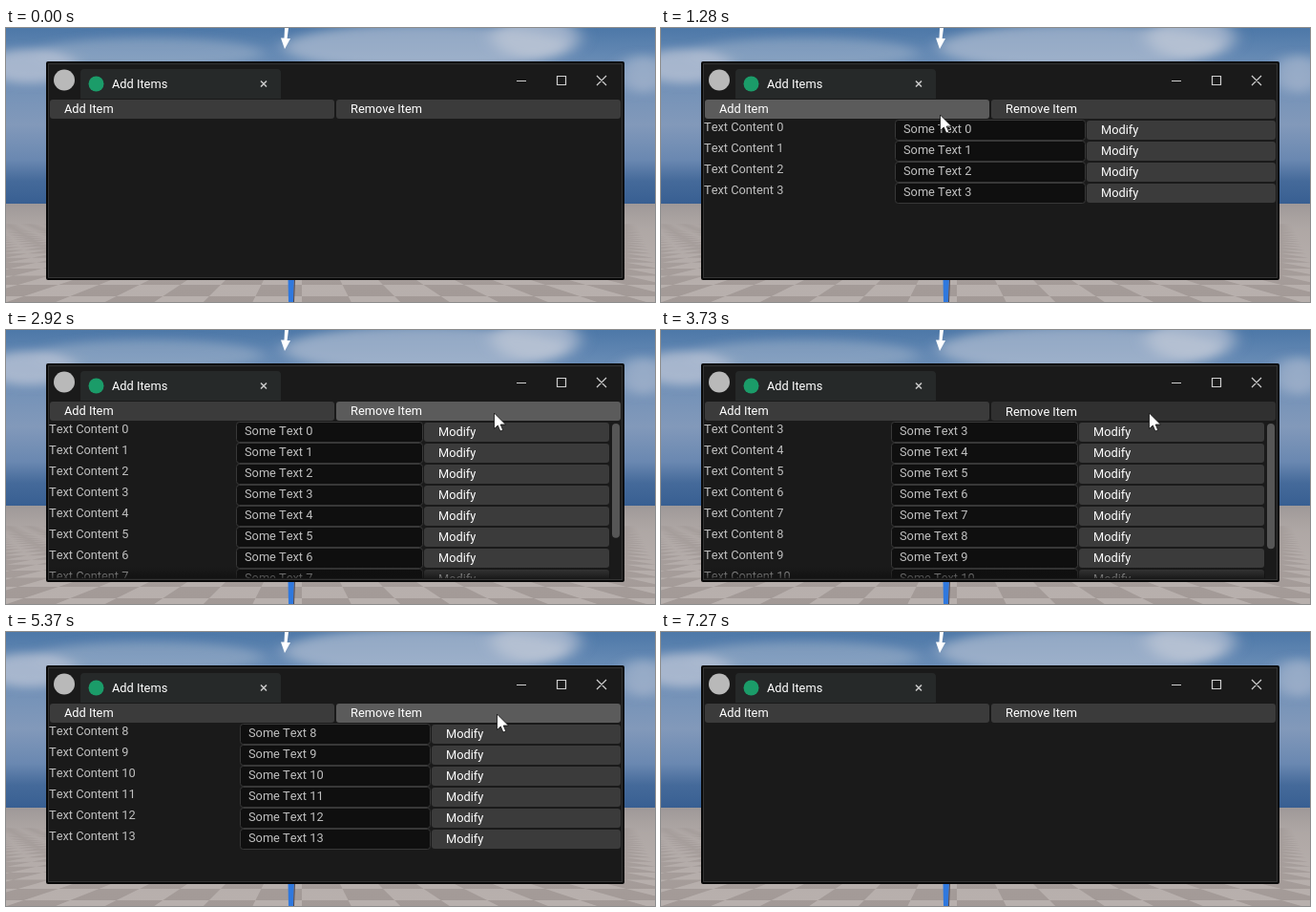
Write an HTML page that moves like this. It is 680 px wide and 287 px high and loops after 7470 ms.

```html
<!DOCTYPE html>
<html lang="en">
<head>
<meta charset="utf-8">
<title>Add Items</title>
<style>
html, body { margin: 0; width: 100%; height: 100%; overflow: hidden; background: #1a1a1a; }
svg { display: block; width: 680px; height: 287px; }
text { font: 12.8px Roboto, "Open Sans", sans-serif; font-kerning: none; fill: #c0c0c0; white-space: pre; }
.label { fill: #fff; }
.btn { fill: #3b3b3b; }
.btn.hover { fill: #5b5b5b; }
.btn.down { fill: #303030; }
.edit { fill: #0f0f0f; stroke: #383838; }
</style>
</head>
<body>
<svg viewBox="0 0 680 287">
  <defs>
    <linearGradient id="sky" x2="0" y2="1">
      <stop offset="0" stop-color="#4d78a8"/>
      <stop offset=".2" stop-color="#6a8db6"/>
      <stop offset=".55" stop-color="#8299ba"/>
      <stop offset=".75" stop-color="#6a88b1"/>
      <stop offset=".87" stop-color="#456a9a"/>
      <stop offset="1" stop-color="#385f92"/>
    </linearGradient>
    <linearGradient id="haze" x2="0" y2="1">
      <stop offset="0" stop-color="#9e9898"/>
      <stop offset=".25" stop-color="#a8a19f" stop-opacity=".6"/>
      <stop offset="1" stop-color="#b4acaa" stop-opacity="0"/>
    </linearGradient>
    <linearGradient id="shade" x2="0" y2="1">
      <stop offset="0" stop-color="#101010" stop-opacity="0"/>
      <stop offset="1" stop-color="#101010" stop-opacity=".75"/>
    </linearGradient>
    <filter id="soft" x="-50%" y="-100%" width="200%" height="300%"><feGaussianBlur stdDeviation="9 5"/></filter>
    <clipPath id="list"><rect x="44" y="96" width="602" height="164"/></clipPath>
  </defs>

  <rect width="680" height="184" fill="url(#sky)"/>
  <g filter="url(#soft)" fill="#c0c8d8">
    <ellipse cx="25" cy="40" rx="50" ry="18" opacity=".7"/>
    <ellipse cx="150" cy="26" rx="120" ry="16" opacity=".35"/>
    <ellipse cx="440" cy="20" rx="150" ry="24" opacity=".6"/>
    <ellipse cx="555" cy="10" rx="46" ry="22" opacity=".7"/>
    <ellipse cx="668" cy="48" rx="26" ry="20" opacity=".5"/>
  </g>
  <rect y="184" width="680" height="103" fill="#b8b0ad"/>
  <path id="floor" fill="#a29996"/>
  <rect y="184" width="680" height="103" fill="url(#haze)"/>

  <path d="M292 0H296L294.600 11H298L292 22 288 10.500H291.500Z" fill="#fff"/>
  <path d="M295.500 262H302L301 287H296Z" fill="#2f78de"/>
  <path d="M302.500 262 301.500 287" stroke="#4a4450"/>

  <rect x="42" y="35" width="606" height="229" rx="2" fill="#080808"/>
  <rect x="44" y="37" width="602" height="225" fill="#1a1a1a"/>
  <rect x="44.500" y="37.500" width="601" height="224" fill="none" stroke="#343434"/>
  <path d="M78 74V47Q78 43 82 43H284Q288 43 288 47V74Z" fill="#262929"/>
  <circle cx="61" cy="54.500" r="11" fill="#b9b9b9"/>
  <circle cx="94.500" cy="58.500" r="8" fill="#1b9c69"/>
  <text class="label" x="111" y="63">Add Items</text>
  <path d="M267 55.500 273 61.500M273 55.500 267 61.500" stroke="#c8c8c8" stroke-width="1.600"/>
  <path d="M535 55.500H545M577.500 50.500H586.500V59.500H577.500ZM619 50 629 60M629 50 619 60" fill="none" stroke="#cfcfcf" stroke-width="1.200"/>

  <g id="top"></g>
  <g clip-path="url(#list)">
    <g id="rows"></g>
    <rect id="fade" x="45" y="248" width="588" height="12" fill="url(#shade)"/>
  </g>
  <rect id="thumb" x="635" y="98" width="8" rx="4" fill="#565656"/>

  <circle id="ring" cx="514" cy="85" r="12" fill="#a39c14"/>
  <path id="cursor" d="M0 0V16.500L3.800 13 6.400 19 9.200 17.800 6.700 12H12Z" fill="#fff" stroke="#111" stroke-width=".8"/>
</svg>
<script>
const LOOP = 7470, VISIBLE = 8, PITCH = 22;
const ADD_HOLD = 75, REMOVE_HOLD = 140, HOVER_LAG = 70, RING_FROM = 4700;

// Click release times: adding speeds up, removing comes in two steady bursts
const series = (n, at) => Array.from({ length: n }, (_, i) => at(i));
const adds = series(14, i => 720 + 190 * i - 3 * i * i);
const removes = series(14, i => (i < 5 ? 3130 : 3935) + 205 * i);

// Pointer path: time, x, y
const path = [
  [70, 360, 264], [450, 292.5, 91], [2650, 292.5, 91], [2860, 511.5, 87], [4050, 511.5, 87],
  [4250, 520, 200], [4430, 519, 200], [4520, 517.5, 159.5], [4650, 514.5, 86],
  [6660, 514.5, 86], [7270, 530, 287]
];

const $ = id => document.getElementById(id);
function set(node, attrs) {
  for (const key in attrs) node.setAttribute(key, attrs[key]);
}
function el(parent, name, attrs, text = "") {
  const node = document.createElementNS("http://www.w3.org/2000/svg", name);
  set(node, attrs);
  node.textContent = text;
  return parent.appendChild(node);
}
const show = (node, on) => set(node, { visibility: on ? "visible" : "hidden" });

function button(parent, x, y, width, label) {
  return {
    y,
    box: el(parent, "rect", { x, y, width, height: 20, rx: 3, class: "btn" }),
    label: el(parent, "text", { x: x + 15, y: y + 14, class: "label" }, label)
  };
}
function paint(b, hover, down) {
  set(b.box, { class: "btn" + (down ? " down" : hover ? " hover" : "") });
  set(b.label, { y: b.y + (down ? 15 : 14) });
}

// Checkered floor in perspective: depth is the distance below the horizon
function drawFloor() {
  const point = (col, depth) => `${(310 + col * depth / 2).toFixed(1)} ${(184 + depth).toFixed(1)}`;
  let d = "";
  for (let k = 6; k < 32; k++) {
    const near = 680 / k, far = 680 / (k + 1), cols = Math.ceil(700 / far);
    for (let j = -cols; j < cols; j++) {
      if ((j + k) % 2) continue;
      d += `M${point(j, near)}L${point(j + 1, near)} ${point(j + 1, far)} ${point(j, far)}Z`;
    }
  }
  set($("floor"), { d });
}

drawFloor();
const addBtn = button($("top"), 46, 75, 298, "Add Item");
const removeBtn = button($("top"), 346, 75, 298, "Remove Item");
const rows = series(VISIBLE, i => {
  const g = el($("rows"), "g", {}), y = 97 + i * PITCH;
  return {
    g,
    name: el(g, "text", { x: 45, y: y + 11 }),
    edit: el(g, "rect", { y: y - .5, height: 21, rx: 3, class: "edit" }),
    value: el(g, "text", { y: y + 13 }),
    modify: button(g, 446, y, 198, "Modify")
  };
});

function pointer(t) {
  const i = path.findIndex(p => p[0] > t);
  if (i < 1) return null;
  const [t0, x0, y0] = path[i - 1], [t1, x1, y1] = path[i], f = (t - t0) / (t1 - t0);
  return { x: x0 + (x1 - x0) * f, y: y0 + (y1 - y0) * f };
}
const count = (times, t) => times.filter(v => v <= t).length;
const held = (times, hold, t) => times.some(v => t >= v - hold && t < v);

function draw(t) {
  const first = count(removes, t), n = count(adds, t) - first;
  const scroll = n >= VISIBLE, colW = scroll ? 196 : 200;
  const pos = pointer(t), over = pointer(t - HOVER_LAG) || { x: -1, y: -1 };
  const onTop = over.y >= 75 && over.y < 96;
  const removing = held(removes, REMOVE_HOLD, t);

  paint(addBtn, onTop && over.x < 345, held(adds, ADD_HOLD, t));
  paint(removeBtn, onTop && over.x > 345, removing);

  const editX = 46 + colW, modX = editX + colW;
  const hot = over.x > modX ? Math.floor((over.y - 96) / PITCH) : -1;
  rows.forEach((row, i) => {
    show(row.g, i < n);
    row.name.textContent = "Text Content " + (first + i);
    row.value.textContent = "Some Text " + (first + i);
    set(row.edit, { x: editX - .5, width: colW - 1 });
    set(row.value, { x: editX + 8 });
    set(row.modify.box, { x: modX, width: colW - 2 });
    set(row.modify.label, { x: modX + 15 });
    paint(row.modify, i === hot, false);
  });

  show($("fade"), scroll);
  show($("thumb"), scroll);
  set($("thumb"), { height: 173 - 3.8 * n });

  show($("ring"), removing && t > RING_FROM);
  show($("cursor"), pos);
  if (pos) set($("cursor"), { transform: `translate(${pos.x.toFixed(1)} ${pos.y.toFixed(1)})` });
}

const start = performance.now();
function tick() {
  draw((performance.now() - start) % LOOP);
  requestAnimationFrame(tick);
}
tick();
</script>
</body>
</html>
```
